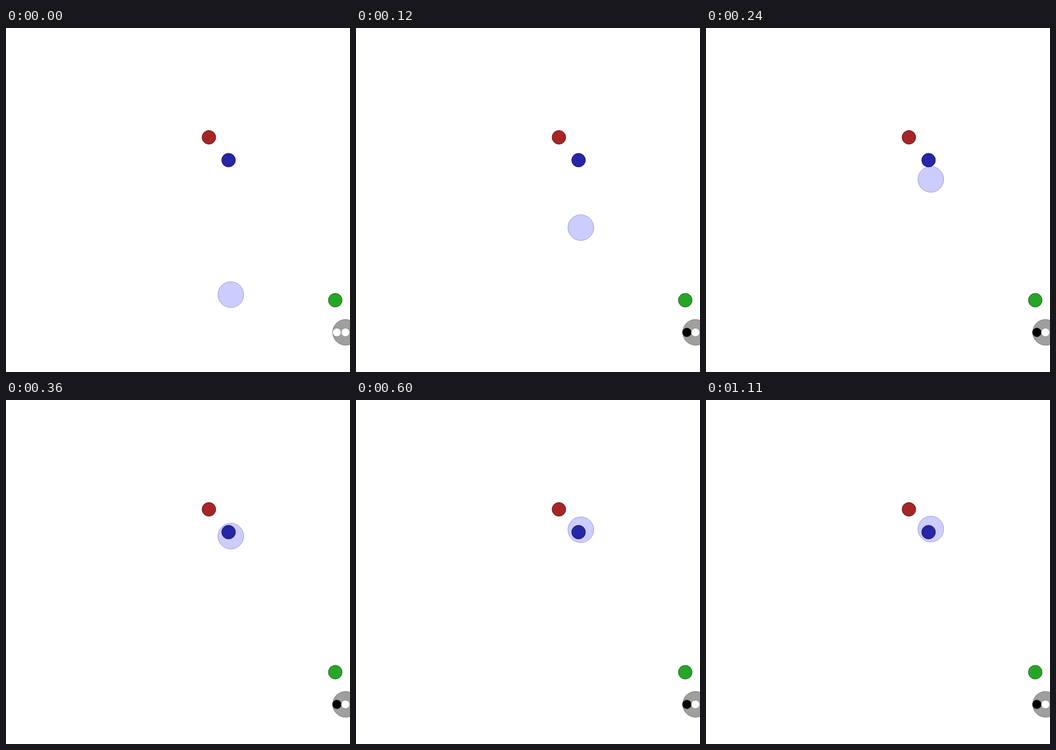
Recreate the animation shown at these times as an HTML page. Size 700 by 700 pixels, loop 1530 ms.

```html
<!DOCTYPE html>
<html lang="en">
<head>
<meta charset="utf-8">
<title>Moving agent</title>
<style>
  html, body { margin: 0; width: 100%; height: 100%; overflow: hidden; background: #fff; }
  svg { display: block; width: 100vw; height: 100vh; }
  #agent { fill: #ccf; stroke: rgba(77, 77, 128, .5); }
  #speaker { fill: #9f9f9f; stroke: rgba(32, 32, 32, .5); }
  .red { fill: #a62626; stroke: #531313; }
  .green { fill: #26a626; stroke: #135313; }
  .blue { fill: #2626a6; stroke: #131353; }
  .signal { fill: #fff; stroke: #808080; }
  .signal.on { fill: #000; stroke: #000; }
</style>
</head>
<body>
<svg viewBox="0 0 700 700">
  <circle id="speaker" cx="690.9" cy="619.3" r="26.25"/>
  <circle id="signal" class="signal" cx="673.3" cy="619.4" r="8.75"/>
  <circle class="signal" cx="690.8" cy="619.4" r="8.75"/>
  <circle id="agent" cx="457.5" cy="542.6" r="26.25"/>
  <circle class="red" cx="412.9" cy="222.5" r="14"/>
  <circle class="green" cx="670" cy="553.9" r="14"/>
  <circle class="blue" cx="452.9" cy="268.9" r="14"/>
</svg>
<script>
  const LOOP = 1530, STEP = 30, LAST = 37;
  const START_Y = 542.6, PUSH = 17.5, PUSH_STEPS = 4, KEEP = 0.75;
  const agent = document.getElementById('agent');
  const signal = document.getElementById('signal');

  // Damped motion: a constant push for the first steps, then coasting.
  function travel(steps) {
    let speed = 0, way = 0;
    for (let i = 0; i < steps; i++) {
      speed = speed * KEEP + (i < PUSH_STEPS ? PUSH : 0);
      way += speed;
    }
    return way;
  }

  const start = performance.now();
  function draw(now) {
    const time = Math.max(0, now - start) % LOOP;
    const step = Math.min(LAST, Math.floor(time / STEP));
    agent.setAttribute('cy', START_Y - travel(step));
    signal.classList.toggle('on', step > 0);
    requestAnimationFrame(draw);
  }
  draw(start);
</script>
</body>
</html>
```
